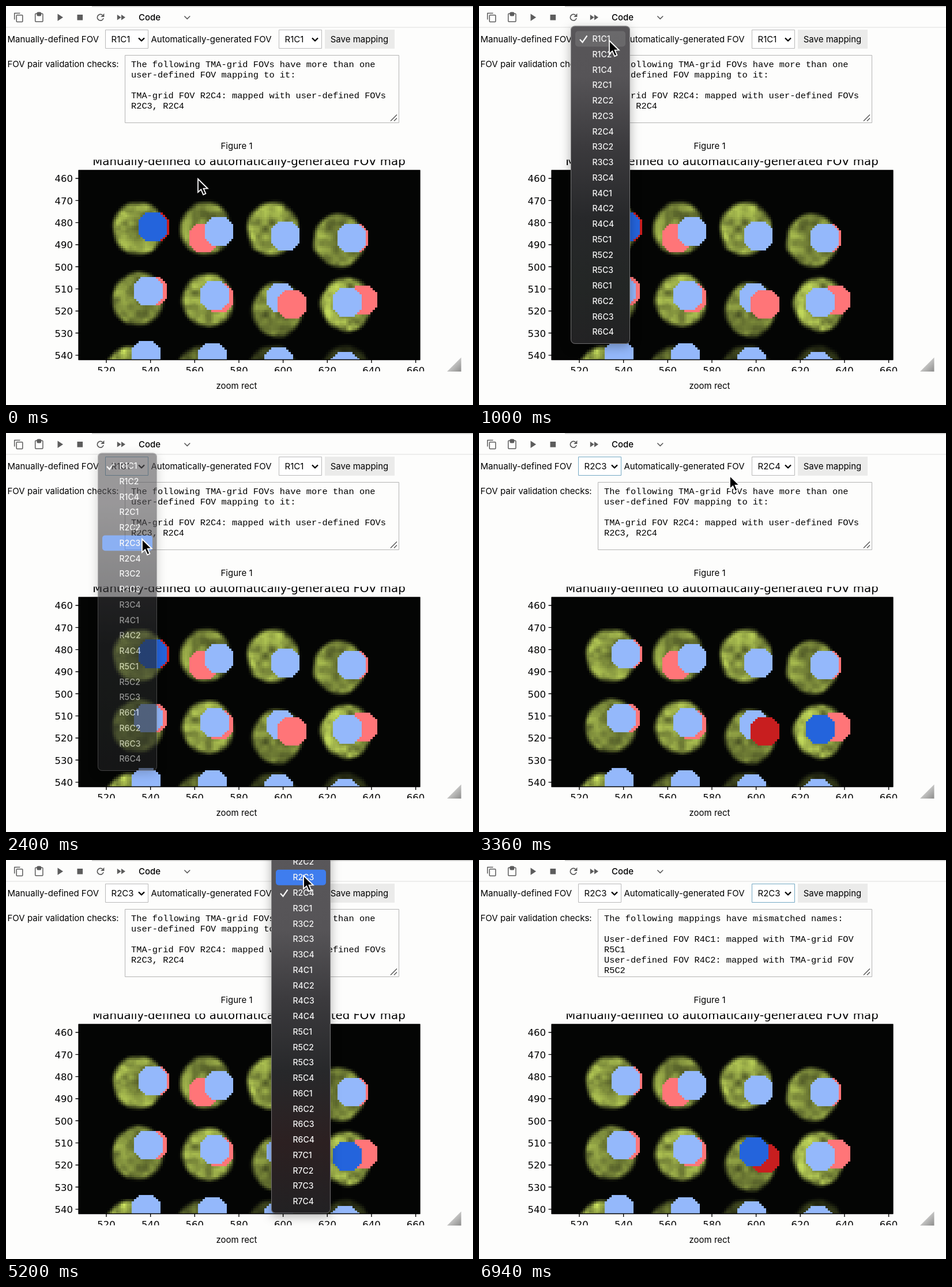
Write an HTML page with a canvas that moves like this. It is 810 px wide and 692 px high and loops after 6.96 s.

```html
<!DOCTYPE html>
<html lang="en">
<head>
<meta charset="utf-8">
<title>FOV mapping</title>
<style>
html, body { margin: 0; width: 810px; height: 692px; overflow: hidden; background: #fdfdfc; }
canvas { display: block; }
</style>
</head>
<body>
<canvas id="stage" width="810" height="692"></canvas>
<script>
const LOOP = 6960;
const UI = 'Inter, "Liberation Sans", sans-serif';
const MONO = '"Liberation Mono", monospace';
const PLOT = '"DejaVu Sans", sans-serif';
const BOX = { x: 126, y: 285, w: 592, h: 328.5 };
const PX = 3.833, ROW = 26.76;
const stage = document.getElementById('stage');
const layer = sheet(stage.width, stage.height);
const screen = stage.getContext('2d');
let ctx = screen;

const LIGHT = ['#ff7578', '#94b8fb'], DARK = ['#c81e1f', '#2464dc'];
const DUPLICATE = ['The following TMA-grid FOVs have more than one', 'user-defined FOV mapping to it:', '',
  'TMA-grid FOV R2C4: mapped with user-defined FOVs', 'R2C3, R2C4'];
const MISMATCH = ['The following mappings have mismatched names:', '',
  'User-defined FOV R4C1: mapped with TMA-grid FOV', 'R5C1',
  'User-defined FOV R4C2: mapped with TMA-grid FOV', 'R5C2'];

// Manual discs, as offsets from the regular automatic grid
const OFFSET = {
  R1C1: [1, 0], R1C2: [-7, 3], R1C4: [1, 0],
  R2C1: [2, 0], R2C2: [2, 1], R2C3: [5, 3], R2C4: [7, -1]
};
// How far some tissue cores sit below their row
const SINK = { R1C4: 20, R2C2: 3, R2C3: 19, R2C4: 10 };

// Pointer stops: arrival, stay, x, y
const STOPS = [
  [0, 0, 333, 300], [900, 450, 226, 60], [2050, 400, 236, 184], [3360, 0, 435, 74],
  [3740, 500, 512, 58], [4900, 550, 516, 27], [5920, 0, 484, 66], [6240, 720, 470, -40]
];

function grid(rows, visit) {
  for (let r = 0; r < rows; r++)
    for (let c = 0; c < 4; c++) visit(`R${r + 1}C${c + 1}`, r, c);
}
function names(rows, ...skip) {
  const out = [];
  grid(rows, id => skip.includes(id) || out.push(id));
  return out;
}
const MENUS = [
  { x: 159, open: 760, shut: 2300, gone: 2550, pick: 0, tint: '#232625',
    items: names(6, 'R1C3', 'R3C1', 'R4C3', 'R5C4') },
  { x: 460, open: 3800, shut: 5420, gone: 5600, pick: 7, tint: '#2c2021', items: names(7) }
];

const smooth = v => { v = Math.max(0, Math.min(1, v)); return v * v * (3 - 2 * v); };
const mix = (a, b, k) => a + (b - a) * k;

function sheet(w, h) {
  const c = document.createElement('canvas');
  c.width = w;
  c.height = h;
  return c;
}
function text(str, x, y, font, color = '#000', align = 'left') {
  ctx.font = font;
  ctx.fillStyle = color;
  ctx.textAlign = align;
  ctx.fillText(str, x, y);
}
function line(color, width, ...pts) {
  ctx.strokeStyle = color;
  ctx.lineWidth = width;
  ctx.beginPath();
  pts.forEach(([x, y]) => ctx.lineTo(x, y));
  ctx.stroke();
}
function poly(color, ...pts) {
  ctx.fillStyle = color;
  ctx.beginPath();
  pts.forEach(([x, y]) => ctx.lineTo(x, y));
  ctx.closePath();
  ctx.fill();
}
function box(color, x, y, w, h) {
  ctx.fillStyle = color;
  ctx.fillRect(x, y, w, h);
}
function frame(color, x, y, w, h, r = 0, width = 1) {
  ctx.strokeStyle = color;
  ctx.lineWidth = width;
  ctx.beginPath();
  ctx.roundRect(x, y, w, h, r);
  ctx.stroke();
}
function pill(color, x, y, w, h, r) {
  ctx.fillStyle = color;
  ctx.beginPath();
  ctx.roundRect(x, y, w, h, r);
  ctx.fill();
}
function chevron(x, y, size, width, color) {
  line(color, width, [x - size, y - size / 2], [x, y + size / 2], [x + size, y - size / 2]);
}

const hash = (x, y) => {
  const s = Math.sin(x * 12.9898 + y * 78.233) * 43758.5453;
  return s - Math.floor(s);
};
function noise(x, y) {
  const i = Math.floor(x), j = Math.floor(y), u = smooth(x - i), v = smooth(y - j);
  return mix(mix(hash(i, j), hash(i + 1, j), u), mix(hash(i, j + 1), hash(i + 1, j + 1), u), v);
}
const colX = u => 174 + (u - 520) * PX;
const rowY = v => 299 + (v - 460) * PX;

// One block of data pixels, snapped to the screen
function block(color, u, v, half = .5) {
  const left = Math.round(colX(u - half)), top = Math.round(rowY(v - .5));
  box(color, left, top, Math.round(colX(u + half)) - left, Math.round(rowY(v + .5)) - top);
}

function tissue() {
  const c = sheet(stage.width, stage.height), cores = [];
  grid(3, (id, r, col) => cores.push({
    x: 230 + col * (116 + 4 * r) - (r > 1 ? 15 : 0),
    y: 386 + 122 * r + (r > 1 ? 6 : SINK[id] || 0),
    shine: r > 1 ? 1.1 / (1 + .9 * col) : (r + col) % 2 ? .84 : 1
  }));
  ctx = c.getContext('2d');
  for (let v = 456; v < 543; v++) for (let u = 507; u < 663; u++) {
    const x = colX(u), y = rowY(v);
    let glow = 0;
    for (const core of cores) {
      const dx = (x - core.x) / 44, dy = (y - core.y) / 46;
      const d = Math.hypot(dx, dy) + (noise(u / 6, v / 6) - .5) * .1;
      // brighter towards the left rim, dim in the middle
      const shade = .74 + .2 * d * d - .1 * dx;
      glow = Math.max(glow, core.shine * shade * smooth((1.12 - d) / .28));
    }
    const grain = 1 + (noise(u / 3.2, v / 3.2) - .5) * .6 + (noise(u / 1.8 + 40, v / 1.8) - .5) * .2;
    const q = glow * grain;
    block(`rgb(${4 + 158 * q},${5 + 176 * q},${4 + 72 * q})`, u, v);
  }
  ctx = screen;
  return c;
}
const TISSUE = tissue();

function disc(u, v, color) {
  for (let dy = -6; dy <= 6; dy++)
    block(color, u, v + dy, Math.min(6, Math.floor(Math.sqrt(48 - dy * dy))) + .5);
}

function plot(manual, auto) {
  ctx.save();
  ctx.beginPath();
  ctx.rect(60, 266.5, 700, 367);
  ctx.clip();
  text('Manually-defined to automatically-generated FOV map', 421.5, 276, `19.75px ${PLOT}`, '#000', 'center');
  for (let v = 460; v <= 540; v += 10) {
    text(v, 116, rowY(v) + 6.2, `16.5px ${PLOT}`, '#000', 'right');
    line('#000', 1.4, [120.5, rowY(v)], [126, rowY(v)]);
  }
  for (let u = 520; u <= 660; u += 20) {
    text(u, colX(u), 637.5, `16.5px ${PLOT}`, '#000', 'center');
    line('#000', 1.4, [colX(u), 613], [colX(u), 619]);
  }
  ctx.save();
  ctx.beginPath();
  ctx.rect(BOX.x, BOX.y, BOX.w, BOX.h);
  ctx.clip();
  ctx.drawImage(TISSUE, 0, 0);
  grid(3, (id, r, c) => {
    const u = Math.round(541 - 1.6 * r) + 30 * c;
    const v = Math.round(482.35 + 28.75 * r + 1.6 * c);
    const blue = () => disc(u, v, (id === auto ? DARK : LIGHT)[1]);
    const shift = OFFSET[id];
    const red = () => shift && disc(u + shift[0], v + shift[1], (id === manual ? DARK : LIGHT)[0]);
    // R2C3 keeps its manual disc on top until both sides match
    (id === 'R2C3' && auto !== id ? [blue, red] : [red, blue]).forEach(paint => paint());
  });
  ctx.restore();
  frame('#000', BOX.x, BOX.y, BOX.w, BOX.h, 0, 1.3);
  ctx.restore();
  const shade = ctx.createLinearGradient(771, 616, 789, 634);
  shade.addColorStop(0, '#dededd');
  shade.addColorStop(1, '#8d8d8c');
  poly(shade, [765, 634], [789.5, 609.5], [789.5, 634]);
}

function toolbar() {
  const c = '#5c5c5c';
  box('#c9c9c8', 149, 0, 661, 1.6);
  box('#dededd', 0, 36.5, 810, 1);
  ctx.lineJoin = 'round';
  line(c, 1.5, [14.7, 23.5], [14.7, 12.5], [24.5, 12.5]);
  frame(c, 18.2, 15.7, 10.6, 11.8, 1, 1.5);
  frame(c, 50.7, 13.2, 13.2, 14, 1.2, 1.5);
  pill(c, 53.4, 10.6, 7.8, 6.9, 2);
  poly(c, [89.5, 13.5], [99, 19.8], [89.5, 26]);
  box(c, 123.5, 15, 9.6, 9.6);
  ctx.lineWidth = 1.7;
  ctx.beginPath();
  ctx.arc(163.8, 19.8, 5.4, .25, 5.4);
  ctx.stroke();
  poly(c, [170.4, 12.8], [170.4, 19], [164.2, 19]);
  for (const x of [192.8, 200]) poly(c, [x, 15], [x + 7, 19.8], [x, 24.6]);
  text('Code', 230, 24.7, `500 15px ${UI}`);
  chevron(314.3, 19.9, 4.9, 1.6, c);
}

function label(str, x, y, align) {
  text(str, x, y, `15px ${UI}`, '#000', align);
}
function select(x, value, focus) {
  box('#fff', x, 41, 75, 33);
  frame(focus ? '#74a9c4' : '#b9b9b9', x + .5, 41.5, 74, 32);
  label(value, x + 10.5, 63.3);
  chevron(x + 63, 58, 5, 2.3, '#000');
}

function form(manual, auto, focus, lines) {
  label('Manually-defined FOV', 2.5, 63.3);
  select(172, manual, focus === 0);
  label('Automatically-generated FOV', 251.5, 63.3);
  select(473, auto, focus === 1);
  box('#ebebea', 553, 41, 121, 33);
  label('Save mapping', 613, 63.3, 'center');
  label('FOV pair validation checks:', 2.5, 105.8);
  frame('#b4b4b4', 206.5, 85.5, 475, 117);
  lines.forEach((s, i) => text(s, 217, 106 + i * 18.05, `15.35px ${MONO}`));
  for (const d of [11, 5]) line('#444', 1.1, [678 - d, 199.5], [678, 199.5 - d]);
  label('Figure 1', 400, 248.3, 'center');
  label('zoom rect', 400, 663.7, 'center');
}

function menu(m, t, y) {
  if (t < m.open || t >= m.gone) return;
  const first = 57 - m.pick * ROW, top = first - 22.5, height = (m.items.length - 1) * ROW + 43;
  ctx = layer.getContext('2d');
  ctx.clearRect(0, 0, layer.width, layer.height);
  const fill = ctx.createLinearGradient(0, 0, 0, 612);
  ['#59575a', '#565457', '#3b3a3d', '#27282a', m.tint, '#222123']
    .forEach((color, i, all) => fill.addColorStop(i / (all.length - 1), color));
  ctx.shadowColor = 'rgba(0,0,0,.3)';
  ctx.shadowBlur = 18;
  ctx.shadowOffsetY = 5;
  pill(fill, m.x, top, 103, height, 7);
  ctx.shadowColor = 'transparent';
  frame('rgba(190,190,190,.5)', m.x + .5, top + .5, 102, height - 1, 7);
  const hover = Math.round((y - first) / ROW);
  pill(hover === m.pick ? 'rgba(255,255,255,.11)' : '#3f7dee', m.x + 8, first + hover * ROW - 13.4, 87, 26.8, 5);
  m.items.forEach((s, i) => text(s, m.x + 37.5, first + i * ROW + 5, `500 14px ${UI}`, '#f6f6f6'));
  line('#f6f6f6', 2.2, [m.x + 16, 58], [m.x + 20.5, 63], [m.x + 28.5, 51.5]);
  ctx = screen;
  // the whole menu fades as one sheet
  ctx.globalAlpha = Math.min(1, (m.gone - t) / (m.gone - m.shut));
  ctx.drawImage(layer, 0, 0);
  ctx.globalAlpha = 1;
}

function pointer(t) {
  const i = STOPS.findLastIndex(s => s[0] <= t);
  const [at, stay, x, y] = STOPS[i], [next, , nx, ny] = STOPS[i + 1] || [LOOP, 0, x, y];
  const k = smooth((t - at - stay) / Math.max(1, next - at - stay));
  return [mix(x, nx, k), mix(y, ny, k)];
}
function cursor(x, y) {
  const pts = [[0, 0], [0, 23], [5.3, 18.2], [9.2, 27.2], [13.4, 25.4], [9.6, 16.7], [16.8, 16.5]]
    .map(([a, b]) => [x + a, y + b]);
  ctx.lineJoin = 'miter';
  poly('#000', ...pts);
  line('#fff', 1.8, ...pts, pts[0], pts[1]);
}

function draw(t) {
  const [x, y] = pointer(t);
  const manual = t < 2550 ? 'R1C1' : 'R2C3';
  const auto = t < 2640 ? 'R1C1' : t < 5600 ? 'R2C4' : 'R2C3';
  const plotted = t < 2640 ? ['R1C1', 'R1C1'] : ['R2C3', t < 5700 ? 'R2C4' : 'R2C3'];
  const focus = t < 760 ? -1 : t < 3800 ? 0 : 1;
  box('#fdfdfc', 0, 0, 810, 692);
  toolbar();
  form(manual, auto, focus, t < 5700 ? DUPLICATE : MISMATCH);
  plot(...plotted);
  MENUS.forEach(m => menu(m, t, y));
  cursor(x, y);
}

const start = performance.now();
function tick(now) {
  draw(Math.max(0, now - start) % LOOP);
  requestAnimationFrame(tick);
}
draw(0);
requestAnimationFrame(tick);
</script>
</body>
</html>
```
